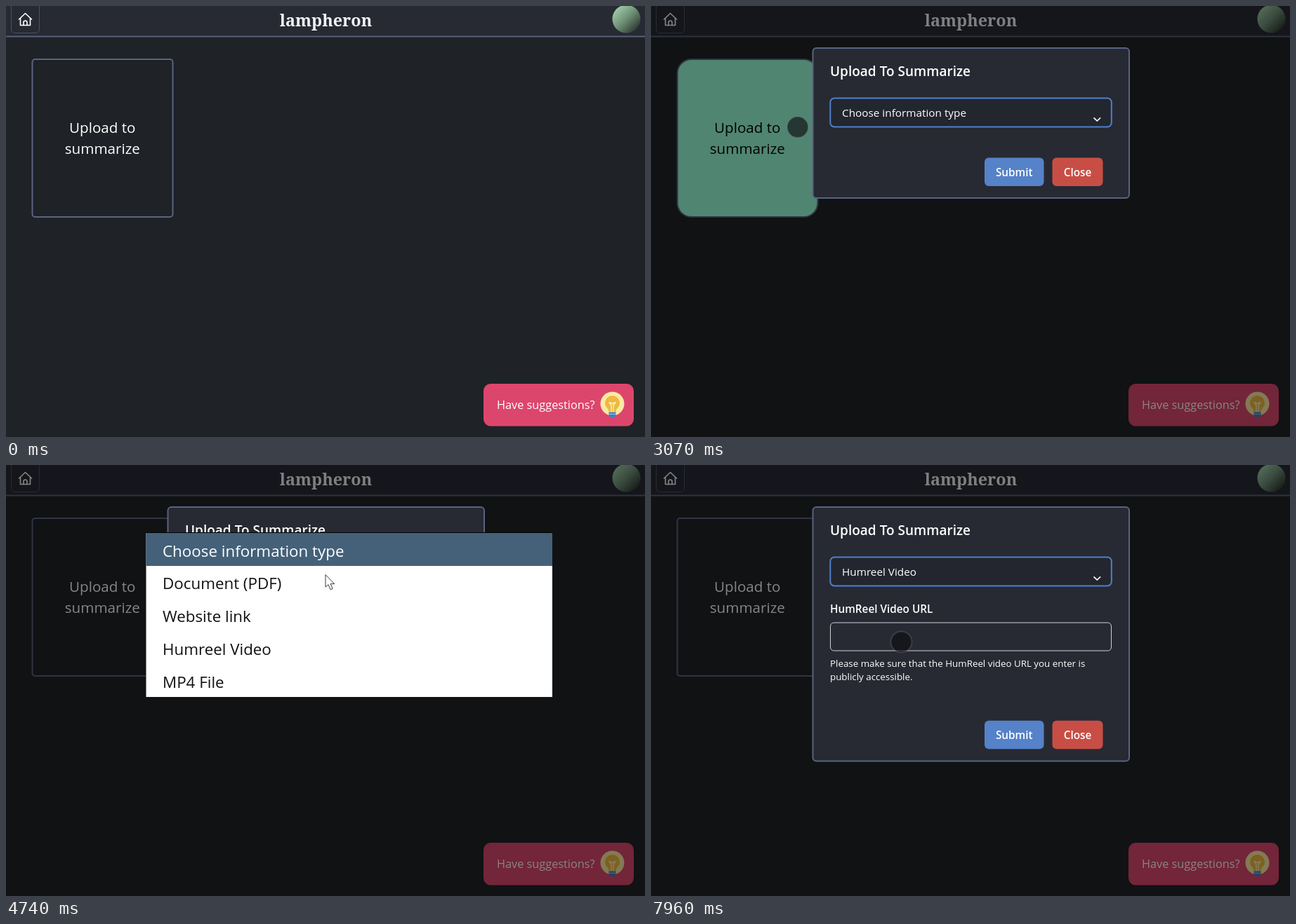
An HTML page that plays this animation: 910x615 px, repeating every 8000 ms.

```html
<!DOCTYPE html>
<html lang="en">
<head>
<meta charset="utf-8">
<title>Upload to summarize</title>
<style>
  html, body { margin: 0; width: 100%; height: 100%; overflow: hidden; background: #1f2226; }
  svg { display: block; width: 100%; height: 100%; }
  text { font-family: "Open Sans", "Noto Sans", sans-serif; fill: #fff; }
  .brand { font: 700 23.4px "Noto Serif", "Liberation Serif", serif; fill: #f3f3f6; }
  .mid { text-anchor: middle; }
  .card { font-size: 20.6px; }
  .title { font-size: 19px; font-weight: 600; }
  .field { font-size: 15.3px; }
  .bold { font-size: 15.3px; font-weight: 600; }
  .hint { font-size: 13.35px; }
  .item { font-size: 22.35px; }
  .line { fill: none; stroke: #fff; stroke-linecap: round; stroke-linejoin: round; }
</style>
</head>
<body>
<svg viewBox="0 0 910 615">
  <defs>
    <linearGradient id="face" x1="0.1" y1="0.1" x2="0.9" y2="0.9">
      <stop offset="0.05" stop-color="#9dc9a6"/>
      <stop offset="0.5" stop-color="#6d8f76"/>
      <stop offset="1" stop-color="#2b332c"/>
    </linearGradient>
  </defs>

  <rect width="910" height="615" fill="#1f2226"/>
  <rect width="910" height="43" fill="#272a33"/>
  <rect y="42.5" width="910" height="2" fill="#566079"/>
  <rect x="7.5" y="-4" width="40" height="42.5" rx="5" fill="none" stroke="#4c5263"/>
  <g class="line" stroke-width="1.6">
    <path d="M18.5 19L27.5 10.5L36.5 19"/>
    <path d="M20.5 17.5V27.5H34.5V17.5"/>
    <path d="M25 27.5V23.5A2.5 2.5 0 0 1 30 23.5V27.5"/>
  </g>
  <text class="brand mid" x="455.5" y="28.5">lampheron</text>
  <circle cx="883.5" cy="18.5" r="20" fill="url(#face)"/>

  <rect id="card" x="37.5" y="76" width="200" height="225" stroke="#5b6382" stroke-width="2"/>
  <g id="cardText">
    <text class="card mid" x="137.3" y="181">Upload to</text>
    <text class="card mid" x="137.3" y="211.3">summarize</text>
  </g>

  <rect x="680" y="539" width="214" height="60.5" rx="10" fill="#dc466c"/>
  <text x="699" y="575" font-size="16.3">Have suggestions?</text>
  <circle cx="863.5" cy="567.5" r="17" fill="#fbeaa3"/>
  <path d="M858.5 579C858.5 574 853 573 853 566.5A10.5 10.5 0 0 1 874 566.5C874 573 868.5 574 868.5 579Z" fill="#edb93f"/>
  <path class="line" style="stroke:#fdf0bd" stroke-width="1.4" d="M862 579V570L859 565.5L863.5 567.5L868 565.5L865 570V579"/>
  <path d="M858.5 579.5H868.5V584L866 587H861L858.5 584Z" fill="#3f7fc1"/>
  <path d="M858.5 582.3H868.5" stroke="#a9c9e6"/>

  <rect id="shade" width="910" height="615"/>

  <g id="modal">
    <rect id="panel" x="230.5" y="60" width="450.5" rx="5" fill="#272a33" stroke="#59637f" stroke-width="2"/>
    <text class="title" x="255" y="99.8">Upload To Summarize</text>
    <rect x="255.3" y="131.5" width="400.5" height="41" rx="6" fill="#23262f" stroke="#4f80cb" stroke-width="2"/>
    <text id="choice" class="field" x="272" y="157.5"></text>
    <path class="line" stroke-width="1.7" d="M631 159.8L635.3 164L639.6 159.8"/>
    <g id="link">
      <text class="bold" x="255" y="210.5">HumReel Video URL</text>
      <rect x="255.5" y="225" width="400" height="40" rx="5" fill="none" stroke="#d0d1d6"/>
      <text class="hint" x="255" y="288">Please make sure that the HumReel video URL you enter is</text>
      <text class="hint" x="255" y="307.3">publicly accessible.</text>
    </g>
    <g id="actions">
      <rect x="475" y="216.5" width="84.5" height="40.5" rx="6" fill="#5582c8"/>
      <text class="bold mid" x="517.2" y="243">Submit</text>
      <rect x="571.5" y="216.5" width="72" height="40.5" rx="6" fill="#c84e45"/>
      <text class="bold mid" x="607.5" y="243">Close</text>
    </g>
  </g>

  <rect id="blank" x="249" y="166" width="579" height="235.5"/>
  <g id="menu">
    <rect x="199" y="96" width="579" height="235"/>
    <rect x="199.5" y="97" width="578.5" height="234" fill="#fff"/>
    <rect x="199.5" y="97" width="578.5" height="47" fill="#446179"/>
  </g>

  <g id="cursor">
    <circle id="dot" r="15" fill="#0d0e12" fill-opacity="0.65" stroke="#85868c" stroke-opacity="0.28" stroke-width="2"/>
    <path id="arrow" d="M0 0V17.7L4 14.2L7 21.3L10.2 20L7.2 13.1H12.8Z" fill="#fff" stroke="#3a3a3e"/>
  </g>
</svg>
<script>
const LOOP = 8000;
const $ = id => document.getElementById(id);
const set = (id, attrs) => {
  for (const key in attrs) $(id).setAttribute(key, attrs[key]);
};
const show = (id, on) => set(id, { visibility: on ? "visible" : "hidden" });

const PROMPT = "Choose information type";
const ITEMS = [PROMPT, "Document (PDF)", "Website link", "Humreel Video", "MP4 File"];
ITEMS.forEach((label, i) => {
  const row = document.createElementNS("http://www.w3.org/2000/svg", "text");
  row.setAttribute("class", "item");
  row.setAttribute("x", 223);
  row.setAttribute("y", 130.6 + i * 46.8);
  row.style.fill = i ? "#111" : "#fff";
  row.textContent = label;
  $("menu").append(row);
});

// Share of a change done at time t, taken in n equal steps; the first is at a.
function steps(t, a, b, n) {
  if (t < a) return 0;
  if (t >= b) return 1;
  return (Math.floor((t - a) / (b - a) * (n - 1)) + 1) / n;
}
const smooth = k => k * k * (3 - 2 * k);
const mix = (a, b, k) => a + (b - a) * k;

// Cursor moves: start, end, steps, then start, control and end points.
const MOVES = [
  [1110, 1530, 7, [-20, 204], [90, 200], [152, 190]],
  [2930, 3680, 12, [152, 190], [340, 128], [451, 157]],
  [3750, 3750, 1, [451, 157], [453, 156], [455, 156.5]],
  [5330, 6100, 12, [455, 157], [385, 190], [327, 229]],
  [6170, 6900, 12, [327, 229], [282, 258], [299, 266]],
  [6980, 6980, 1, [299, 266], [300, 266], [300, 266.5]],
  [7830, 7960, 3, [300, 266.5], [325, 262], [356.5, 252.5]]
];

function cursorAt(t) {
  const move = MOVES.filter(m => t >= m[0]).pop() || MOVES[0];
  const [a, b, n, p, c, q] = move;
  const k = smooth(steps(t, a, b, n));
  return [0, 1].map(i => mix(mix(p[i], c[i], k), mix(c[i], q[i], k), k));
}

function draw(t) {
  const open = steps(t, 2190, 2470, 5);
  const hover = t >= 2190 && t < 4400;
  const picked = t >= 7370;

  const glow = t < 4400
    ? smooth(Math.max(0, Math.min(1, (t - 2190) / 290)))
    : 1 - smooth(Math.min(1, (t - 4400) / 320));
  const rgb = [[31, 152], [34, 255], [38, 216]].map(([a, b]) => Math.round(mix(a, b, glow)));
  set("card", { fill: `rgb(${rgb})`, rx: hover ? 20 : 4 });
  for (const line of $("cardText").children) line.style.fill = hover ? "#000" : "#fff";

  set("shade", { opacity: 0.48 * (1 - (1 - open) ** 2) });
  const pop = 1 - (1 - open) ** 3;
  const size = mix(0.95, 1, pop);
  set("modal", {
    opacity: pop,
    transform: `translate(455.7 167) scale(${size}) translate(-455.7 -167)`
  });
  set("panel", { height: picked ? 362.5 : 214 });
  set("actions", { transform: `translate(0 ${picked ? 148.3 : 0})` });
  $("choice").textContent = picked ? ITEMS[3] : PROMPT;
  show("link", picked);

  show("blank", t >= 4400 && t < 4540);
  show("menu", t >= 4540 && t < 7370);

  const native = t >= 4270 && t < 7500;
  const [x, y] = cursorAt(t);
  set("cursor", { transform: `translate(${x} ${y})` });
  show("dot", !native && t >= 1110);
  show("arrow", native);
}

const start = performance.now();
function tick() {
  draw((performance.now() - start) % LOOP);
  requestAnimationFrame(tick);
}
tick();
</script>
</body>
</html>
```
